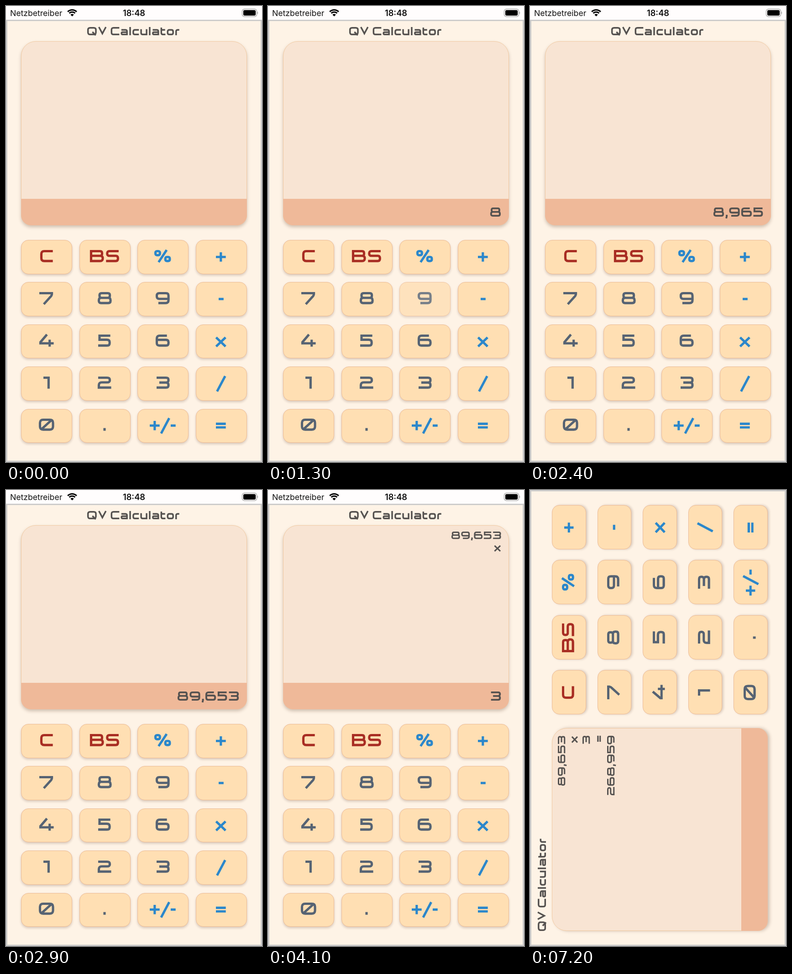
An HTML page that plays this animation: 561 by 998 pixels, repeating every 8 s.

```html
<!DOCTYPE html>
<html lang="en">
<head>
<meta charset="utf-8">
<title>Calculator</title>
<style>
  html, body { margin: 0; width: 100%; height: 100%; overflow: hidden; background: #fff; }
  #stage { position: relative; width: 561px; height: 998px; overflow: hidden; }
  .scene, .scene *, .status { position: absolute; box-sizing: border-box; }
  .scene { left: 0; background: #fef3e6; border: 3px solid #cecdcc; }
  .layer { left: -3px; }
  .portrait { top: 30px; width: 561px; height: 968px; }
  .portrait .layer { top: -33px; }
  .landscape { top: 0; width: 998px; height: 561px; transform-origin: 0 0; transform: matrix(0, -1, 1, 0, 0, 998); }
  .landscape .layer { top: -3px; }
  .panel { background: #f8e4d3; border: 1.5px solid #f2cba3; border-radius: 32px 32px 22px 22px; box-shadow: 0 4px 7px rgba(90, 60, 40, .28); }
  .bar { background: #efb999; border-radius: 0 0 22px 22px; }
  .key { background: #ffdfb3; border: 1.5px solid #ecbb96; border-radius: 16px; box-shadow: 0 3px 5px rgba(90, 60, 40, .22); }
  .word { overflow: visible; width: 1px; height: 1px; }
  .word path { fill: none; stroke: currentColor; stroke-width: 5.2; }
  .word text { fill: none; font: 27px Inter, sans-serif; }
  .status { left: 0; top: 0; width: 561px; height: 30px; background: #fffdfd; }
  .status text { font: 17.6px Inter, sans-serif; fill: #111; }
  .status .clock { font-weight: 600; font-size: 18.3px; text-anchor: middle; }
</style>
</head>
<body>
<div id="stage">
  <svg class="status" viewBox="0 0 561 30">
    <text x="9" y="22">Netzbetreiber</text>
    <text class="clock" x="280.5" y="22">18:48</text>
    <g fill="none" stroke="#000" stroke-width="3.2">
      <path d="M135.3 12.6A13.5 13.5 0 0 1 154.7 12.6"/>
      <path d="M138.7 15.9A8.8 8.8 0 0 1 151.3 15.9"/>
    </g>
    <path d="M145 22.8L141.3 18.9A5 5 0 0 1 148.7 18.9Z"/>
    <rect x="517.6" y="6.6" width="32" height="16.8" rx="5" fill="none" stroke="#999" stroke-width="1.2"/>
    <rect x="520" y="9" width="27.2" height="12" rx="3"/>
    <path d="M551 12Q553.5 15 551 18Z" fill="#999"/>
  </svg>
</div>
<script>
const LOOP = 8000, GAP = 4.8;
const INK = '#555250', DIGIT = '#566373', BLUE = '#2b87cb', RED = '#a82d23';

const box = (l, t, r, b, k) =>
  `M${l + k} ${t}H${r - k}Q${r} ${t} ${r} ${t + k}V${b - k}Q${r} ${b} ${r - k} ${b}` +
  `H${l + k}Q${l} ${b} ${l} ${b - k}V${t + k}Q${l} ${t} ${l + k} ${t}Z`;

// Wide display lettering: [width, stroke path], cap height 27
const GLYPHS = {
  '0': [34, box(2.5, 2.5, 31.5, 24.5, 7) + 'M6.5 23L27.5 4'],
  '1': [14, 'M0 2.5H11.5V27'],
  '2': [30, 'M1 2.5H21Q27 2.5 27 7.8Q27 13 21 13H9Q2.5 13 2.5 19V24.5H30'],
  '3': [30, 'M1 2.5H22Q27.5 2.5 27.5 7.5Q27.5 13.3 22 13.3H7M22 13.3Q27.5 13.3 27.5 19Q27.5 24.5 22 24.5H1'],
  '4': [33, 'M18 0L3.5 17V19.5H33M24 11.5V27'],
  '5': [28, 'M27 2.5H3V11.5H19Q25.5 11.5 25.5 17V19Q25.5 24.5 20 24.5H0'],
  '6': [31, 'M2.5 11.8H23Q28.5 11.8 28.5 17V19Q28.5 24.5 23 24.5H8Q2.5 24.5 2.5 19V9Q2.5 2.5 9 2.5H25'],
  '7': [31, 'M0 2.5H28V5Q27.5 8 25 10.5L10 27'],
  '8': [31, box(4, 2.5, 27, 13, 4.5) + box(2.5, 13, 28.5, 24.5, 5)],
  '9': [31, 'M28.5 15.2H8Q2.5 15.2 2.5 10V8Q2.5 2.5 8 2.5H23Q28.5 2.5 28.5 8V18Q28.5 24.5 22 24.5H6'],
  '.': [6, 'M3 21V27'],
  ',': [6, 'M3.5 21.5V26L2 32'],
  '+': [22, 'M0 15.5H22M11 5V26'],
  '-': [11, 'M0 15.5H11'],
  '/': [15, 'M-1.5 33L16.5 -1'],
  '=': [22, 'M0 11.5H22M0 19.5H22'],
  'x': [26, 'M2.5 6.5L23.5 26.5M23.5 6.5L2.5 26.5'],
  '%': [37, box(2.5, 2.5, 12.5, 11.5, 4) + box(24.5, 15.5, 34.5, 24.5, 4) + 'M27.5 0L9.5 27'],
  'B': [31, 'M2.5 13V2.5H22.5Q27 2.5 27 7.5Q27 13 22.5 13H2.5V24.5H22.5Q28.5 24.5 28.5 18.5Q28.5 13 22.5 13'],
  'C': [28, 'M28 2.5H9Q2.5 2.5 2.5 9V18Q2.5 24.5 9 24.5H28'],
  'Q': [31, box(2.5, 2.5, 28.5, 24.5, 7) + 'M17 16L28 27'],
  'S': [29, 'M28 2.5H7.5Q2.5 2.5 2.5 7.5Q2.5 13 7.5 13H21.5Q26.5 13 26.5 18.8Q26.5 24.5 21.5 24.5H0'],
  'V': [28, 'M2.5 0L14 21.5L25.5 0'],
  'a': [23, 'M2 9.5H15Q20.5 9.5 20.5 14V24.5H6Q2.5 24.5 2.5 20.8Q2.5 17 6 17H20.5'],
  'c': [21, 'M21 9.5H8Q2.5 9.5 2.5 15V19Q2.5 24.5 8 24.5H21'],
  'l': [6, 'M3 0V27'],
  'o': [23, box(2.5, 9.5, 20.5, 24.5, 5.5)],
  'r': [13, 'M2.5 27V14Q2.5 9.5 8 9.5H13'],
  't': [16, 'M2.5 2V19Q2.5 24.5 8 24.5H16M2.5 9.5H15'],
  'u': [23, 'M2.5 7V19Q2.5 24.5 8 24.5H20.5V7'],
  ' ': [4, '']
};

function add(parent, cls, x, y, w, h) {
  const el = document.createElement('div');
  el.className = cls;
  el.style.cssText = `left:${x}px;top:${y}px;width:${w}px;height:${h}px`;
  parent.append(el);
  return el;
}

// align: 0 left, .5 centre, 1 right
function word(parent, str, x, base, cap, color, align) {
  let pen = 0, paths = '';
  for (const ch of str) {
    const [w, d] = GLYPHS[ch];
    paths += `<path transform="translate(${pen})" d="${d}"/>`;
    pen += w + GAP;
  }
  const s = cap / 27, left = x - (pen - GAP) * s * align;
  parent.insertAdjacentHTML('beforeend',
    `<svg class="word" style="left:${left}px;top:${base - cap}px;color:${color}">` +
    `<g transform="scale(${s})"><text y="27">${str}</text>${paths}</g></svg>`);
  return parent.lastChild;
}

const sheet = document.head.appendChild(document.createElement('style'));
let count = 0;

// Hard opacity changes at [ms, opacity] marks
function steps(el, ...marks) {
  const name = 'step' + count++;
  const keys = marks.map(([t, v]) => `${t / LOOP * 100}%{opacity:${v}}`).join('');
  sheet.append(`@keyframes ${name}{${keys}}\n`);
  el.style.animation = `${name} ${LOOP}ms step-end infinite`;
}
const during = (el, from, to) => steps(el, [0, 0], [from, 1], [to, 0]);

const KEYS = [['C', 'BS', '%', '+'], ['7', '8', '9', '-'], ['4', '5', '6', 'x'], ['1', '2', '3', '/'], ['0', '.', '+/-', '=']];
const keyColor = k => /[CB]/.test(k) ? RED : /^[\d.]$/.test(k) ? DIGIT : BLUE;

function scene(cls, { title, panel, pad }) {
  const root = document.createElement('div');
  root.className = 'scene ' + cls;
  stage.append(root);
  const layer = add(root, 'layer', 0, 0, 0, 0);
  layer.removeAttribute('style');
  word(layer, 'QV Calculator', title[0], title[1], 18, INK, 0);
  const [px, py, pw, ph] = panel;
  add(layer, 'panel', px, py, pw, ph);
  add(layer, 'bar', px, py + ph - 58, pw, 58);
  const [x, y, w, dx, dy] = pad, keys = {};
  KEYS.forEach((row, r) => row.forEach((k, c) => {
    const key = keys[k] = add(layer, 'key', x + c * dx, y + r * dy, w, 74.6);
    word(key, k, w / 2 - 1.5, 47.5, 26.6, keyColor(k), .5);
  }));
  const right = px + pw - 17;
  const tape = (lines, first = 0) => {
    const g = add(layer, 'tape', 0, 0, 0, 0);
    lines.forEach((s, i) => word(g, s, right, py + 30 + (first + i) * 26.8, 16.2, INK, 1));
    return g;
  };
  const value = s => word(layer, s, right - 1, py + ph - 19, 20, INK, 1);
  return { root, keys, tape, value };
}

const tall = scene('portrait', {
  title: [178, 63.5], panel: [33, 77, 495, 403], pad: [33, 512, 112, 127.6, 92.4]
});
const wide = scene('landscape', {
  title: [33, 34.5], panel: [33, 47.5, 444, 473.5], pad: [507, 48, 97, 120.4, 99.5]
});

const ENTRIES = [['8', 1000], ['89', 1500], ['896', 1900], ['8,965', 2300], ['89,653', 2900], ['', 3500], ['3', 4100], ['', 4800]];
ENTRIES.forEach(([s, from], i) => s && during(tall.value(s), from, ENTRIES[i + 1][1]));

const SUM = ['89,653', 'x', '3', '=', '268,959'];
during(tall.tape(SUM.slice(0, 2)), 3500, 7200);
during(tall.tape(SUM.slice(2), 2), 4800, 7200);
wide.tape(SUM);

const DIM = .8;
const press = (k, ...marks) => steps(tall.keys[k], [0, 1], ...marks);
press('8', [800, DIM], [1000, 1]);
press('9', [1300, DIM], [1500, 1]);
press('6', [1800, DIM], [1900, 1]);
press('5', [2200, DIM], [2300, .92], [2400, 1]);
press('3', [2800, DIM], [2900, 1], [3900, DIM], [4100, 1]);
press('x', [3400, DIM], [3500, 1]);
press('=', [4700, DIM], [4800, 1]);
during(wide.root, 7200, LOOP);
</script>
</body>
</html>
```
